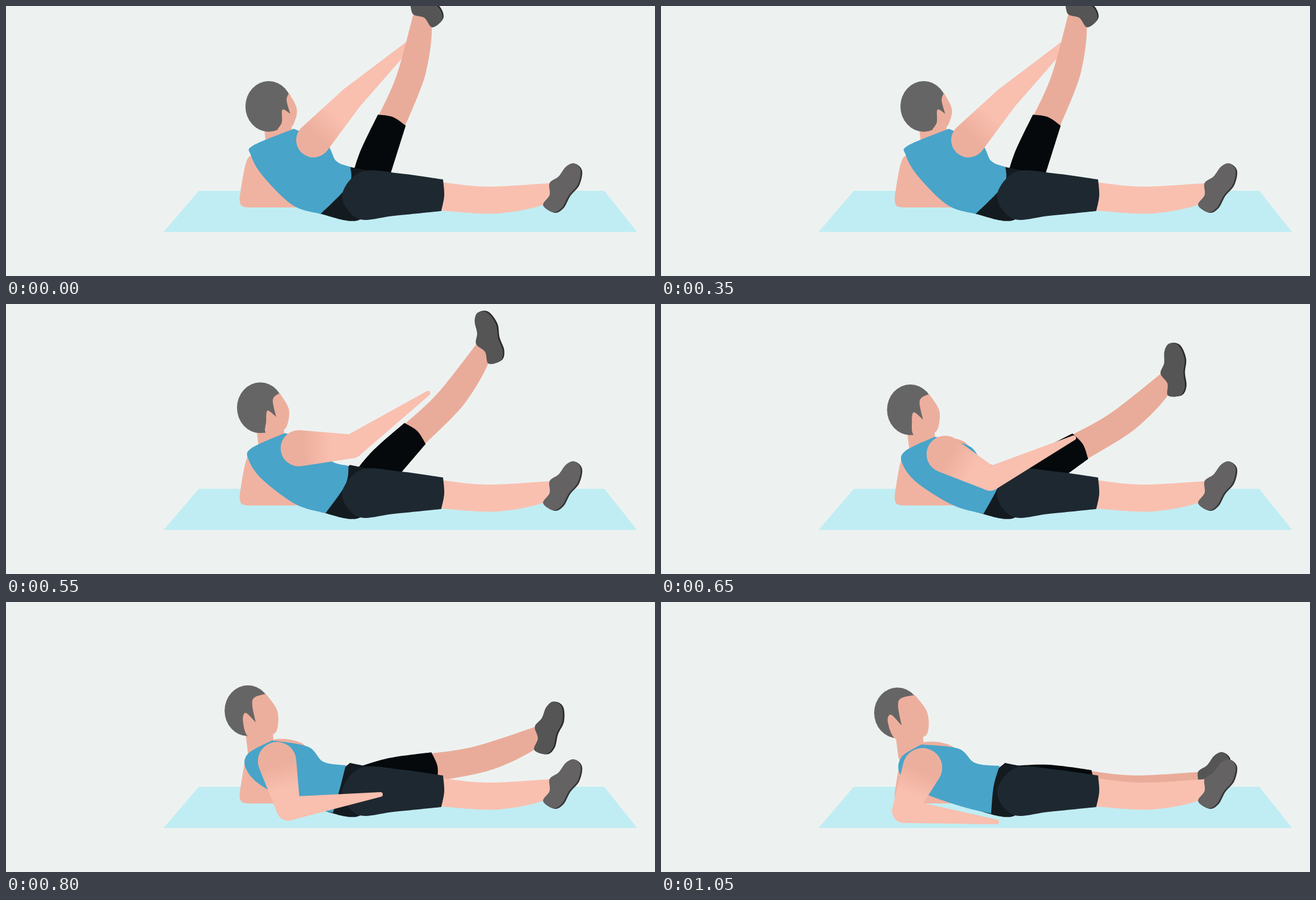
Write an HTML page with a canvas that moves like this. It is 1087 px wide and 453 px high and loops after 1.1 s.

```html
<!DOCTYPE html>
<html lang="en">
<head>
<meta charset="utf-8">
<title>Leg lower exercise</title>
<style>
  html, body { margin: 0; width: 100%; height: 100%; overflow: hidden; background: #edf2f1; }
  canvas { display: block; }
</style>
</head>
<body>
<canvas id="stage" width="1087" height="453"></canvas>
<script>
const ctx = document.getElementById('stage').getContext('2d');

const LOOP = 1100, STEP = 50, MOVE_START = 380, MOVE_TIME = 530;
const HIP = [603, 300], LEG_SWING = 71.7;
const SKIN = '#f9bfaf', SHADE = '#edaf9d', BLACK = '#05090b';

// Outlines are flat x,y lists; a repeated point makes a corner.
const PROP_ARM = [408, 252, 393, 310, 393, 333, 404, 338, 404, 338, 490, 338, 490, 338, 440, 285];
const LEG = [726, 295, 726, 295, 805, 303, 915, 297, 915, 297, 910, 329, 825, 348, 726, 343, 726, 343];
const SHOE = [913, 298, 928, 287, 940, 271, 954, 265, 965, 277, 960, 301, 945, 319, 934, 339,
  919, 347, 902, 335, 913, 318];
const FAR_THIGH = [732, 294, 732, 294, 660, 285, 600, 287, 600, 287, 600, 346, 600, 346,
  729, 344, 729, 344, 736, 319];
const THIGH = [732, 291, 732, 291, 660, 281, 595, 278, 563, 318, 590, 357, 650, 352,
  729, 344, 729, 344, 734, 318];
const PELVIS = [545, 300, 576, 270, 576, 270, 620, 279, 620, 279, 595, 357, 527, 349, 527, 349];

// Pairs of outlines: leg raised, leg lowered
const FACE = [
  [474, 146, 474, 146, 487, 172, 483, 195, 474, 206, 455, 209, 462, 195, 463, 174,
    476, 181, 476, 181, 470, 158],
  [425, 156, 425, 156, 445, 183, 448, 212, 438, 227, 395, 231, 380, 202, 385, 189,
    403, 207, 403, 207, 398, 166]
];
const TORSO = [
  [410, 250, 414, 234, 482, 206, 482, 206, 535, 230, 553, 260, 577, 270, 577, 270,
    574, 300, 527, 349, 527, 349, 480, 334, 430, 285],
  [400, 288, 403, 260, 436, 239, 436, 239, 498, 246, 526, 270, 567, 275, 567, 275,
    557, 310, 553, 355, 553, 355, 500, 342, 430, 316]
];

const rad = deg => deg * Math.PI / 180;
const lerp = (a, b, k) => a + (b - a) * k;
const mix = (a, b, k) => a.map((v, i) => lerp(v, b[i], k));
const polar = ([x, y], deg, len) => [x + Math.cos(rad(deg)) * len, y + Math.sin(rad(deg)) * len];

function fill(color) {
  ctx.fillStyle = color;
  ctx.fill();
}

function ellipse([x, y], rx, ry, tilt, color) {
  ctx.beginPath();
  ctx.ellipse(x, y, rx, ry, rad(tilt), 0, 2 * Math.PI);
  fill(color);
}

// Smooth closed curve through the points
function blob(pts, color) {
  const n = pts.length / 2;
  const at = i => [pts[(i + n) % n * 2], pts[(i + n) % n * 2 + 1]];
  ctx.beginPath();
  ctx.moveTo(pts[0], pts[1]);
  for (let i = 0; i < n; i++) {
    const [a, b, c, d] = [at(i - 1), at(i), at(i + 1), at(i + 2)];
    if (b[0] === c[0] && b[1] === c[1]) continue;
    ctx.bezierCurveTo(
      b[0] + (c[0] - a[0]) / 6, b[1] + (c[1] - a[1]) / 6,
      c[0] - (d[0] - b[0]) / 6, c[1] - (d[1] - b[1]) / 6, c[0], c[1]);
  }
  fill(color);
}

// Hull of two circles
function taper(a, ra, b, rb, color) {
  const dir = Math.atan2(b[1] - a[1], b[0] - a[0]);
  const lean = Math.acos((ra - rb) / Math.hypot(b[0] - a[0], b[1] - a[1]));
  ctx.beginPath();
  ctx.arc(...a, ra, dir + lean, dir - lean);
  ctx.arc(...b, rb, dir - lean, dir + lean);
  fill(color);
}

function mat() {
  ctx.beginPath();
  ctx.moveTo(323, 310);
  ctx.lineTo(1002, 310);
  ctx.lineTo(1057, 379);
  ctx.lineTo(264, 379);
  fill('#c0edf3');
}

function lowerLeg(skin, shoe, sole) {
  blob(LEG, skin);
  blob(SHOE, sole);
  ctx.save();
  ctx.translate(-2.5, -1);
  blob(SHOE, shoe);
  ctx.restore();
}

function farLeg(p) {
  ctx.save();
  ctx.translate(...HIP);
  ctx.rotate(-rad(LEG_SWING * (1 - p)));
  ctx.translate(-HIP[0] - 11, -HIP[1] - 12);
  lowerLeg('#eaac9a', '#555555', '#2b2a2b');
  blob(FAR_THIGH, BLACK);
  ctx.restore();
}

function head(p) {
  taper(mix([455, 200], [415, 215], p), 23, mix([458, 235], [419, 255], p), 22, SHADE);
  ellipse(mix([440, 168.5], [396, 186], p), 39, 42.5, 0, '#666565');
  blob(mix(...FACE, p), SHADE);
}

function armJoints(p) {
  const shoulder = mix([515, 225], [438, 278], p);
  const angle = lerp(-48, 113, p ** 1.1);
  const elbow = polar(shoulder, angle, lerp(93, 79, p));
  const hand = polar(elbow, lerp(-43, 6.7, p ** 1.6), 156);
  return { shoulder, elbow, hand };
}

function upperArm({ shoulder, elbow }, p) {
  const skin = ctx.createLinearGradient(...shoulder, ...elbow);
  skin.addColorStop(.1, SHADE);
  skin.addColorStop(.6, SKIN);
  taper(shoulder, lerp(29, 33, p), elbow, 20, skin);
}

function draw(ms) {
  const t = Math.floor(ms % LOOP / STEP) * STEP;
  const p = Math.min(1, Math.max(0, (t - MOVE_START) / MOVE_TIME));
  const arm = armJoints(p);
  const forearm = () => taper(arm.elbow, 20, arm.hand, 4, SKIN);
  const reaching = p < .25; // the hand is behind the raised leg

  ctx.fillStyle = '#edf2f1';
  ctx.fillRect(0, 0, 1087, 453);
  mat();
  blob(PROP_ARM, '#f0b3a2');
  head(p);
  ellipse(mix([505, 222], [463, 244], p), 30, 9, 8, SHADE);
  if (reaching) forearm();
  farLeg(p);
  blob(PELVIS, '#141b20');
  blob(mix(...TORSO, p), '#48a4c9');
  lowerLeg('#f9c0b0', '#646262', '#353335');
  blob(THIGH, '#1e2830');
  upperArm(arm, p);
  if (!reaching) forearm();
}

const start = performance.now();
function tick() {
  draw(performance.now() - start);
  requestAnimationFrame(tick);
}
tick();
</script>
</body>
</html>
```
